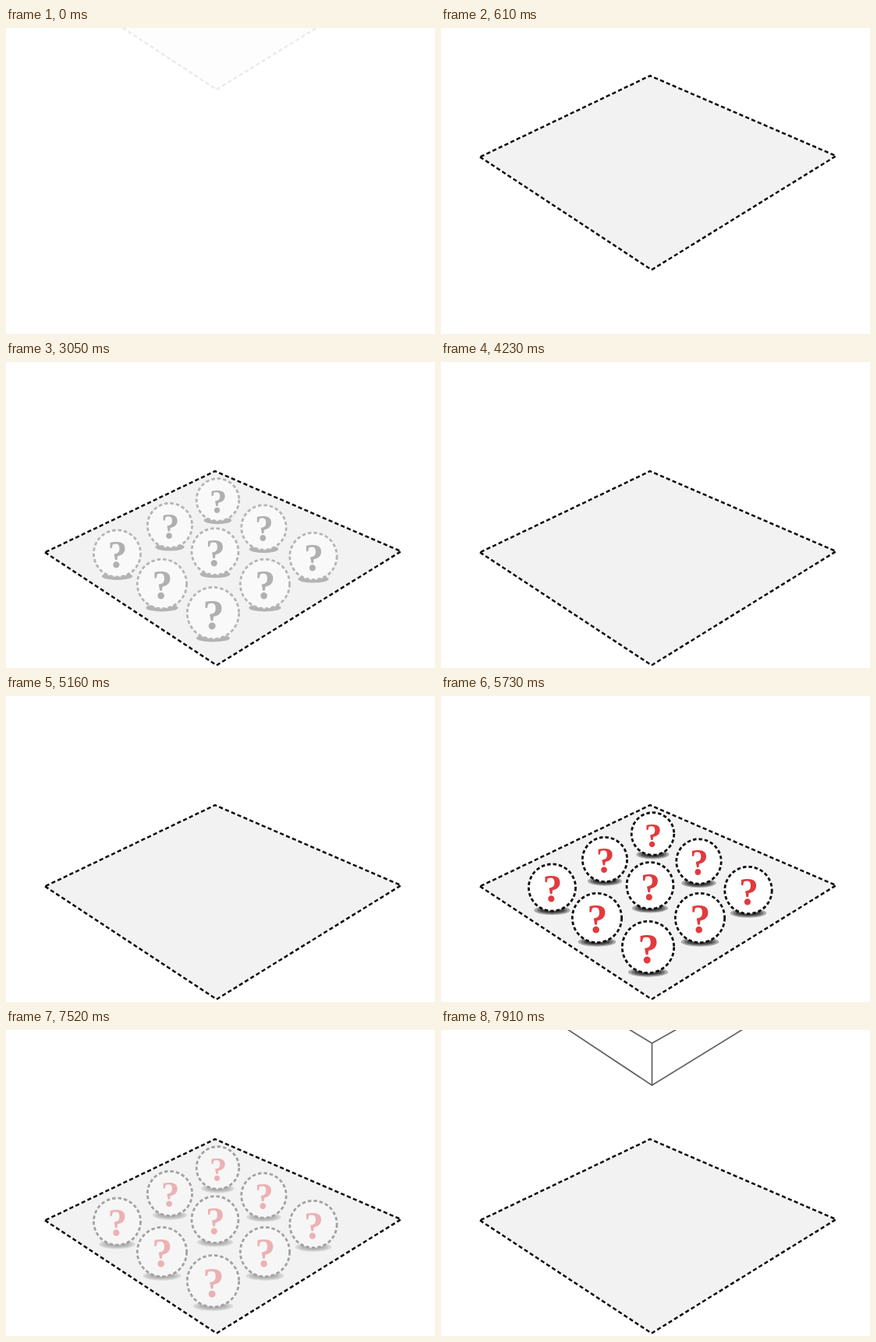
An HTML page that plays this animation: 550 px wide and 393 px high, repeating every 8 s.

```html
<!DOCTYPE html>
<html lang="en">
<head>
<meta charset="utf-8">
<title>Unknown items</title>
<style>
  html, body { margin: 0; width: 100%; height: 100%; overflow: hidden; background: #fff; }
  svg { display: block; }
  .floor { fill: #f2f2f2; stroke: #0c0c0c; stroke-width: 2.5; stroke-dasharray: 5.2 3.3; }
  .outer { fill: #aaa; }
  .middle { fill: #777; }
  .inner { fill: #484848; }
  .ball { fill: #fff; stroke: #0c0c0c; stroke-width: 2.8; stroke-dasharray: 4.5 3; }
  .mark { fill: #e23a3e; font-family: "Liberation Serif", "Times New Roman", serif; font-weight: bold; text-anchor: middle; }
  .pale .outer { fill: none; }
  .pale .middle, .pale .inner { fill: #b3b3b3; }
  .pale .ball { fill: #f9f9f9; stroke: #b5b5b5; }
  .pale .mark { fill: #b0b0b0; }
  .cube { fill: none; stroke: #000; stroke-width: 1.7; }
</style>
</head>
<body>
<svg width="550" height="393" viewBox="0 0 550 393">
  <path id="floor" class="floor" d="M50 244.5L270 389.5L506.5 243.2L268 140.2Z"/>
  <g id="balls"></g>
  <path id="cube" class="cube" d="M270.5 -54V0M50.5 -146L270.5 0L507 -146M50.5 -187.5L270.5 -54L507 -188"/>
</svg>
<script>
const LOOP = 8000;
const $ = id => document.getElementById(id);
const floor = $('floor'), balls = $('balls'), cube = $('cube');

function add(tag, attrs, text = '') {
  const el = document.createElementNS('http://www.w3.org/2000/svg', tag);
  for (const key in attrs) el.setAttribute(key, attrs[key]);
  el.textContent = text;
  balls.append(el);
}

// Nearer balls, lower on the stage, are larger
function addBall([x, y]) {
  const r = 20.1 + 0.0405 * y;
  ['outer', 'middle', 'inner'].forEach((name, i) => add('ellipse', {
    class: name, cx: x, cy: y + 0.97 * r, rx: (0.77 - 0.12 * i) * r, ry: 6 - 1.2 * i
  }));
  add('circle', { class: 'ball', cx: x, cy: y, r });
  add('text', { class: 'mark', x: x + 0.5, y: y + 0.61 * r, 'font-size': 1.66 * r }, '?');
}

[[271.5, 177], [210, 210], [330.5, 212.5], [268, 243.5], [142.5, 246],
  [394, 249.5], [200, 285], [332, 285], [265.5, 322.5]].forEach(addBall);

const ramp = (t, from, to) => Math.min(1, Math.max(0, (t - from) / (to - from)));
const swing = p => 0.5 - 0.5 * Math.cos(Math.PI * p);
const within = (t, from, to) => t >= from && t < to;

function draw(t) {
  const drop = swing(ramp(t, -80, 957));
  floor.setAttribute('transform', `translate(0 ${315 * (drop - 1)})`);
  floor.setAttribute('opacity', 0.08 + 0.92 * ramp(t, 0, 520));

  // The balls appear, blink twice and fade away
  const shown = within(t, 3050, 4230) || within(t, 4690, 5160) || t >= 5730;
  balls.setAttribute('opacity', shown ? 1 - ramp(t, 7220, 7680) : 0);
  balls.setAttribute('class', t < 3130 ? 'pale' : '');

  const arrive = ramp(t, 7730, 7910);
  cube.setAttribute('transform', `translate(0 ${64 + 7 * arrive ** 2})`);
  cube.setAttribute('opacity', 0.62 * arrive);
}

const start = performance.now();
function frame() {
  const t = (performance.now() - start) % LOOP;
  draw(t < 140 ? 0 : t);
  requestAnimationFrame(frame);
}
frame();
</script>
</body>
</html>
```
